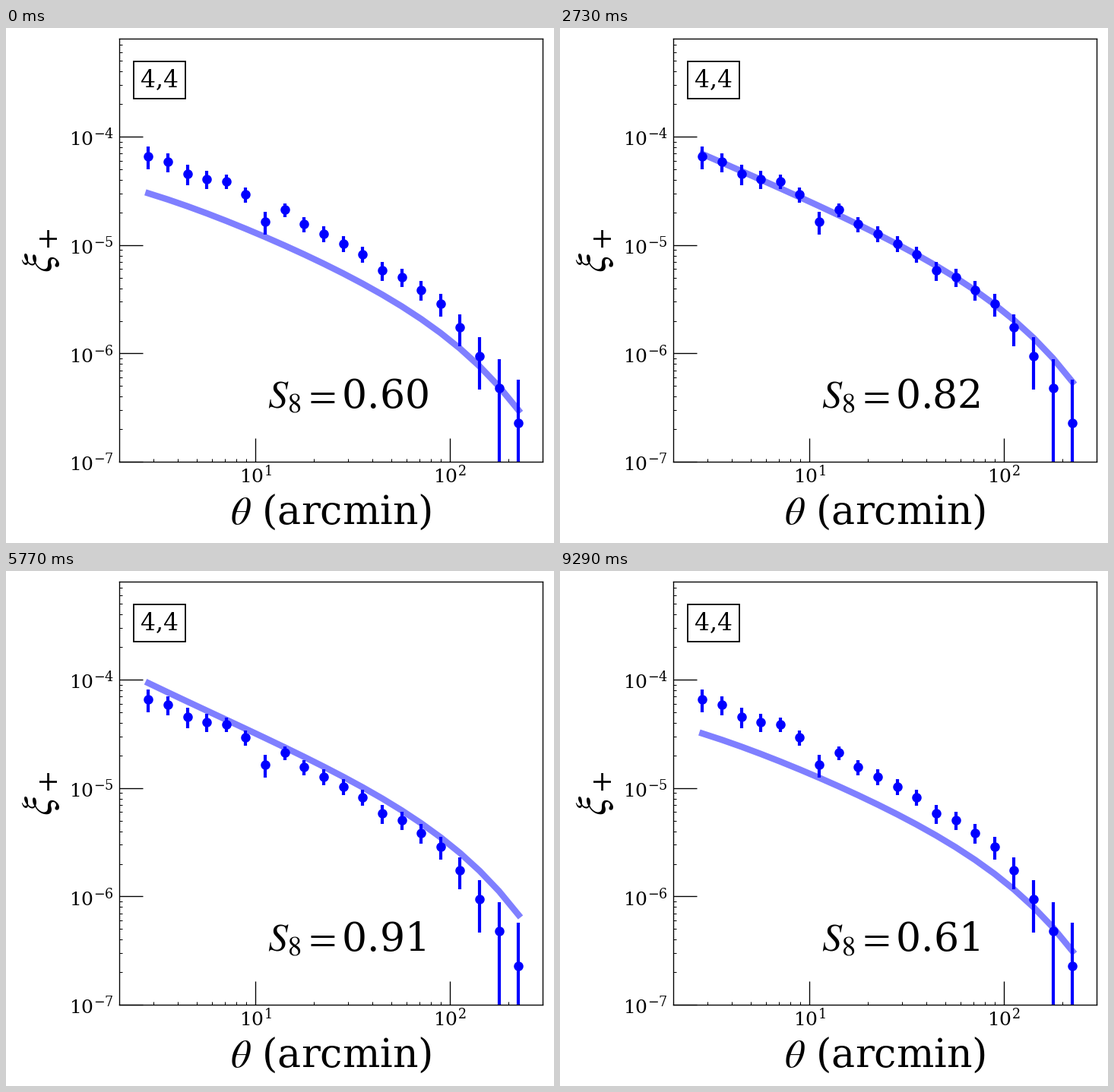
Write a matplotlib script that moves like this. It is 721 by 678 pixels and loops after 9.45 s.

```python
import numpy as np
import matplotlib.pyplot as plt
from matplotlib.animation import FuncAnimation

W, H, DPI = 721, 678, 128
PT = 150 / DPI                      # plot sizes are given in points at 150 dpi
LOOP_MS, FRAMES = 9450, 59
HALF = 29                           # steps from the lowest to the highest S8
S8_MIN, S8_MAX, S8_REF = 0.60, 0.99, 0.8152

plt.rcParams.update({
    "font.family": "DejaVu Serif",
    "mathtext.fontset": "stix",
    "axes.linewidth": 0.65 * PT,
    "patch.linewidth": 0.85 * PT,
})

theta = np.geomspace(2.82, 225.5, 20)


def model(s8):
    """Power law with a cutoff; small angles react more strongly to S8."""
    shape = 1.549e-4 * theta ** -0.764 * np.exp(-(theta / 152.9) ** 1.06)
    return shape * (s8 / S8_REF) ** (1.95 + 2.17 / theta)


def measured():
    """Points near the model, with a few outliers and a falling tail."""
    i = np.arange(theta.size)
    offset = -0.103 * np.maximum(i - 15.3, 0)
    for k, d in {0: -0.03, 2: -0.034, 4: 0.06, 5: 0.02,
                 6: -0.15, 7: 0.044, 12: -0.048}.items():
        offset[k] += d
    u = i / (theta.size - 1)
    sigma = 10 ** (-4.815 - 2.005 * u + 0.36 * u ** 2)
    return model(0.82) * 10 ** offset, sigma


def s8_at(frame):
    step = max(frame - 1, 0)        # the lowest value is held for two steps
    return S8_MIN + (S8_MAX - S8_MIN) * min(step, 2 * HALF - step) / HALF


def label(s8):
    return f"$S_8=${s8:.2f}"


fig = plt.figure(figsize=(W / DPI, H / DPI), dpi=DPI, facecolor="white")
left, top, side = 149.1, 14.2, 557
ax = fig.add_axes([left / W, 1 - (top + side) / H, side / W, side / H])
ax.set_xscale("log")
ax.set_yscale("log")

curve, = ax.plot(theta, model(S8_MIN), color="blue", alpha=0.5, lw=4 * PT)
xi, sigma = measured()
ax.errorbar(theta, xi, yerr=sigma, fmt="o", color="blue",
            ms=5 * PT, mew=1 * PT, elinewidth=2 * PT, capsize=0)

ax.set_xlim(2, 300)
ax.set_ylim(1e-7, 8e-4)
ax.tick_params(which="major", direction="in", length=15 * PT, width=0.65 * PT,
               labelsize=12 * PT)
ax.tick_params(which="minor", direction="in", length=2 * PT, width=0.5 * PT)
ax.tick_params(axis="x", which="both", pad=1.9 * PT)
ax.tick_params(axis="y", which="both", pad=3.5 * PT)
ax.set_xlabel(r"$\theta$ (arcmin)", fontsize=25 * PT, labelpad=4.2 * PT)
ax.set_ylabel(r"$\xi_+$", fontsize=27 * PT, labelpad=4.8 * PT)

ax.text(0.05, 0.9024, "4,4", transform=ax.transAxes, fontsize=15 * PT, va="center",
        bbox=dict(boxstyle="square,pad=0.3", facecolor="white", edgecolor="black"))
value = ax.text(0.35, 0.127, label(S8_MIN), transform=ax.transAxes, fontsize=25 * PT)


def update(frame):
    s8 = s8_at(frame)
    curve.set_ydata(model(s8))
    value.set_text(label(s8))
    return curve, value


anim = FuncAnimation(fig, update, frames=FRAMES, interval=LOOP_MS / FRAMES,
                     repeat=True, repeat_delay=0, blit=False)
plt.show()
```
